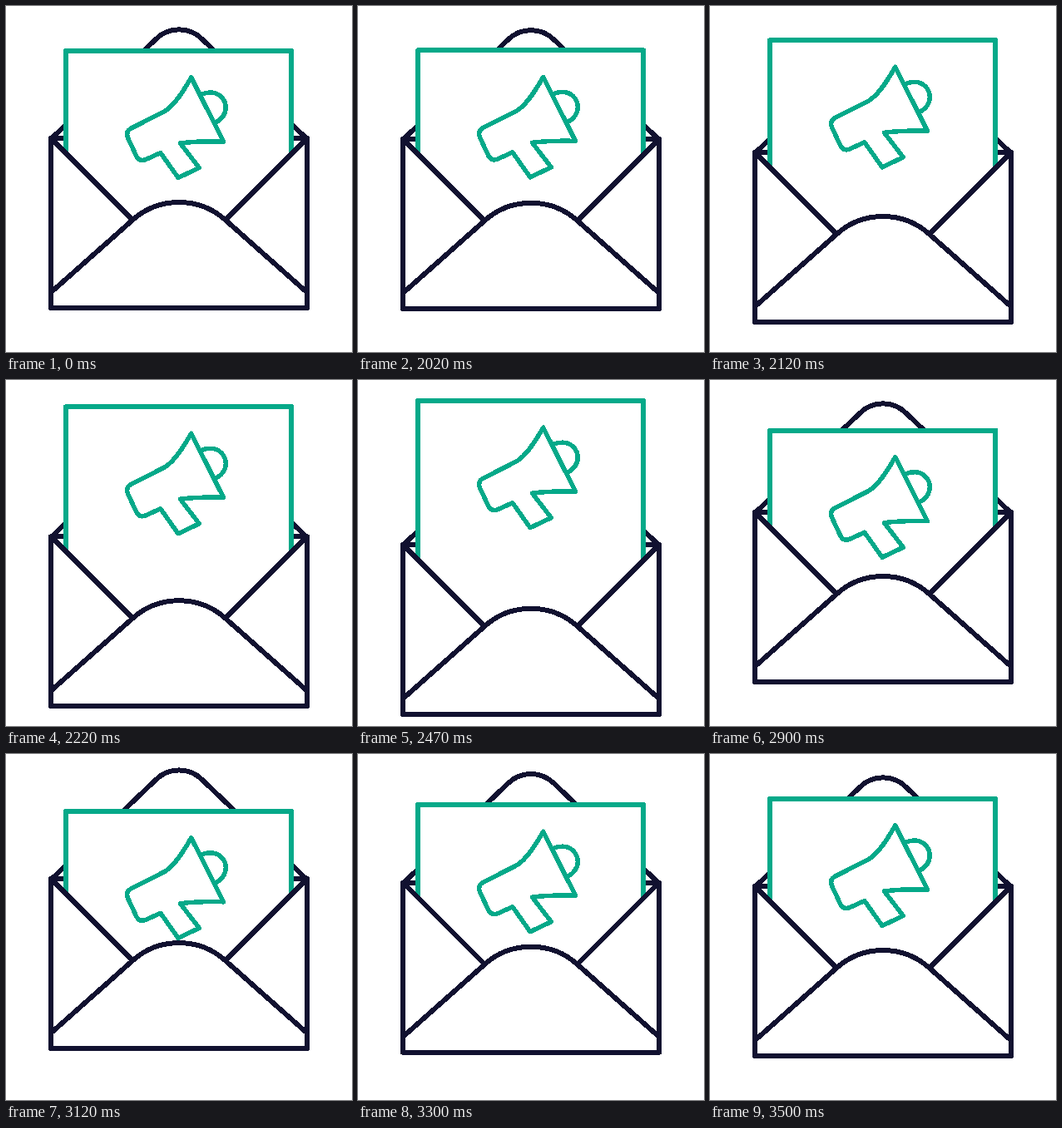
An HTML page that plays this animation: 416x416 px, repeating every 3520 ms.

```html
<!DOCTYPE html>
<html lang="en">
<head>
<meta charset="utf-8">
<title>Letter in envelope</title>
<style>
  html, body { margin: 0; width: 100%; height: 100%; overflow: hidden; background: #fff; }
  svg { display: block; width: 100%; height: 100%; shape-rendering: crispEdges; }
  path { stroke-linecap: round; stroke-linejoin: round; }
  .env path { stroke: #111130; stroke-width: 6; fill: none; }
  .letter path { stroke: #05a989; stroke-width: 5.5; fill: none; }
  .letter .paper { fill: #fff; stroke-width: 6; }
  .env .mask { fill: #fff; stroke: none; }
</style>
</head>
<body>
<svg viewBox="0 0 416 416">
  <g class="env">
    <path d="M55.5 158.5 L180 40 C188 32 198 28.3 208 28.3 S228 32 236 40 L360.5 158.5"/>
    <path d="M54 159 H362"/>
  </g>
  <g class="letter">
    <path class="paper" d="M72 330 V54 H343.3 V330"/>
    <path d="M222.7 86 L261.5 163 C243 162.5 226 162.8 209.5 165 L232.3 194.5 L207 206.5 L185.8 176.5
             L168 184.6 Q160.5 187.5 157 181 L146.5 158.5 Q143.5 151 150 147.3 L191 126.5 C203 119 213 103 222.7 86 Z"/>
    <path d="M235 106.3 C238 104.8 242 104 246 104 A18.3 18.3 0 0 1 264.3 122 C264.3 130 259 137 251.3 140.3"/>
  </g>
  <g class="env">
    <path class="mask" d="M54 159 L152 257 C168 243 188 236 208 236 S248 243 264 257 L362 159 V363 H54 Z"/>
    <path d="M54 159 V363 H362 V159"/>
    <path d="M54 159 L151.5 256.5 M362 159 L264.5 256.5"/>
    <path d="M55 343.5 L152 257.5 C168 243 188 236 208 236 S248 243 264 257.5 L361 343.5"/>
  </g>
</svg>
<script>
  const LOOP = 3520, TICK = 25;

  // time, envelope offset, letter offset, easing handles towards the next row
  const KEYS = [
    { t: 2000, env: 0,  letter: 0,   ease: [0.2, 0.18] },
    { t: 2525, env: 39, letter: -29, ease: [0.52, 0.46] },
    { t: 3090, env: -9, letter: 15,  ease: [0.42, 0.58] },
    { t: 3500, env: 0,  letter: 0 }
  ];

  // cubic-bezier(x1, 0, x2, 1), solved by bisection
  function bezier([x1, x2], x) {
    let lo = 0, hi = 1, u = 0.5;
    for (let i = 0; i < 24; i++) {
      u = (lo + hi) / 2;
      const v = 1 - u;
      if (3 * x1 * u * v * v + 3 * x2 * u * u * v + u * u * u < x) lo = u; else hi = u;
    }
    return u * u * (3 - 2 * u);
  }

  function pose(t) {
    const i = KEYS.findIndex((k, n) => n < KEYS.length - 1 && t >= k.t && t < KEYS[n + 1].t);
    if (i < 0) return { env: 0, letter: 0 };
    const a = KEYS[i], b = KEYS[i + 1];
    const p = bezier(a.ease, (t - a.t) / (b.t - a.t));
    return { env: a.env + (b.env - a.env) * p, letter: a.letter + (b.letter - a.letter) * p };
  }

  const envParts = document.querySelectorAll('.env');
  const letter = document.querySelector('.letter');
  const shift = (el, y) => el.setAttribute('transform', `translate(0 ${y.toFixed(3)})`);

  let start;
  function draw(now) {
    start ??= now;
    const time = (now - start) % LOOP;
    const p = pose(Math.floor((time + 5) / TICK) * TICK);
    envParts.forEach(el => shift(el, p.env));
    shift(letter, p.letter);
    requestAnimationFrame(draw);
  }
  requestAnimationFrame(draw);
</script>
</body>
</html>
```
